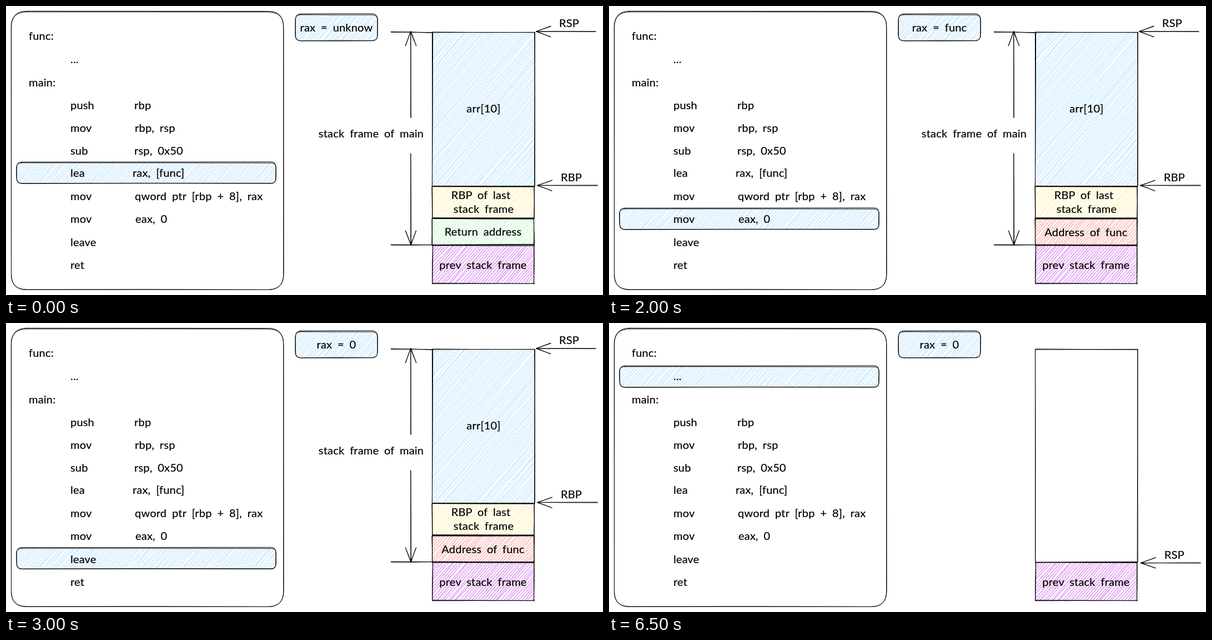
Write an HTML page that moves like this. It is 1075 px wide and 521 px high and loops after 7.5 s.

```html
<!DOCTYPE html>
<html lang="en">
<head>
<meta charset="utf-8">
<title>Stack frame walkthrough</title>
<style>
  html, body { margin: 0; width: 100%; height: 100%; overflow: hidden; background: #fff; }
  svg { display: block; width: 1075px; height: 521px; }
  path { fill: none; stroke: #000; stroke-width: 1; stroke-linecap: round; stroke-linejoin: round; }
  text {
    font: 20px Lato, "Open Sans", sans-serif; letter-spacing: .2px; word-spacing: 4.5px;
    fill: #000; stroke: #000; stroke-width: .2px; white-space: pre;
  }
</style>
</head>
<body>
<svg id="stage" viewBox="0 0 1075 521"></svg>
<script>
const stage = document.getElementById('stage');
const BLUE = '#a5d8ff', YELLOW = '#ffec99', GREEN = '#b2f2bb', RED = '#ff8787', PURPLE = '#cc5de8';
const LOOP = 7500;
const STEPS = [
  { at: 0, row: 282, rax: 'rax = unknow' },
  { at: 1000, row: 325.5, rax: 'rax = func' },
  { at: 2000, row: 365, rax: 'rax = func' },
  { at: 3000, row: 405.5, rax: 'rax = 0' },
  { at: 4000, row: 446, rax: 'rax = 0' },
  { at: 5000, row: 78, rax: 'rax = 0' }
];

let seed = 11;
function random() {
  seed = (seed + 0x6D2B79F5) | 0;
  let t = Math.imul(seed ^ (seed >>> 15), 1 | seed);
  t = (t + Math.imul(t ^ (t >>> 7), 61 | t)) ^ t;
  return ((t ^ (t >>> 14)) >>> 0) / 4294967296;
}
const shake = amount => (random() * 2 - 1) * amount;
const near = (v, amount = .8) => (v + shake(amount)).toFixed(2);

function add(parent, tag, attrs, text) {
  const node = document.createElementNS('http://www.w3.org/2000/svg', tag);
  for (const key in attrs) node.setAttribute(key, attrs[key]);
  if (text) node.textContent = text;
  return parent.appendChild(node);
}

const label = (g, x, y, text, anchor = 'start') => add(g, 'text', { x, y, 'text-anchor': anchor }, text);
const centred = (g, x, y, text) => label(g, x, y, text, 'middle');

// A pen line drawn twice with a small bow
function line(g, x1, y1, x2, y2, amount = .8) {
  let d = '';
  for (let pass = 0; pass < 2; pass++) {
    d += `M${near(x1, amount)} ${near(y1, amount)}` +
      `Q${near((x1 + x2) / 2, amount)} ${near((y1 + y2) / 2, amount)} ${near(x2, amount)} ${near(y2, amount)}`;
  }
  add(g, 'path', { d });
}

function hatch(g, x, y, w, h, colour) {
  const angle = 49 * Math.PI / 180, sin = Math.sin(angle), cos = Math.cos(angle);
  const end = (x + w) * sin + (y + h) * cos;
  let d = '';
  for (let c = x * sin + y * cos + 2; c < end; c += 4) {
    const left = Math.max(x, (c - (y + h) * cos) / sin);
    const right = Math.min(x + w, (c - y * cos) / sin);
    const low = (c - left * sin) / cos, high = (c - right * sin) / cos;
    for (let pass = 0; pass < 2; pass++) {
      d += `M${near(left, 1.4)} ${near(low, 1.4)}L${near(right, 1.4)} ${near(high, 1.4)}`;
    }
  }
  add(g, 'path', { d, style: `stroke:${colour};stroke-width:.7` });
}

function box(g, x, y, w, h, colour) {
  if (colour) hatch(g, x, y, w, h, colour);
  line(g, x, y, x + w, y);
  line(g, x + w, y, x + w, y + h);
  line(g, x + w, y + h, x, y + h);
  line(g, x, y + h, x, y);
}

function roundBox(g, x, y, w, h, r, colour) {
  if (colour) hatch(g, x + 1, y + 1, w - 2, h - 2, colour);
  const X = x + w, Y = y + h;
  let d = '';
  for (const lift of [-.8, .7]) {
    const t = y + lift, b = Y + shake(.6), l = x + shake(.4), k = X + shake(.5);
    d += `M${x + r} ${t}Q${x + w / 2} ${near(t)} ${X - r} ${near(t, .5)}` +
      `Q${k} ${t} ${k} ${y + r}L${near(k, .4)} ${Y - r}` +
      `Q${k} ${b} ${X - r} ${b}Q${x + w / 2} ${near(b)} ${x + r} ${near(b, .5)}` +
      `Q${l} ${b} ${l} ${Y - r}L${near(l, .4)} ${y + r}Q${l} ${t} ${x + r} ${t}`;
  }
  add(g, 'path', { d });
}

function arrow(g, x1, y1, x2, y2) {
  line(g, x1, y1, x2, y2, .5);
  const size = Math.hypot(x2 - x1, y2 - y1);
  const ux = (x1 - x2) / size, uy = (y1 - y2) / size;
  for (const side of [-9.5, 9.5]) {
    line(g, x2, y2, x2 + ux * 26 - uy * side, y2 + uy * 26 + ux * side, .6);
  }
}

function pointer(g, name, tip, tail, y, textX) {
  arrow(g, tail, y, tip, y);
  label(g, textX, y - 8, name);
}

const parts = [];
// A group that is visible for the steps first..last
function part(first, last) {
  const node = add(stage, 'g');
  parts.push({ node, first, last });
  return node;
}

roundBox(stage, 9.5, 10, 490, 501.5, 28);
roundBox(stage, 521, 15, 148, 47.5, 10, BLUE);
const cursor = add(stage, 'g');
roundBox(cursor, 19.5, 0, 467, 37.5, 9, BLUE);
const rax = centred(stage, 595, 45.5, ' ');

const CODE = [
  ['push', 'rbp', 186, 231], ['mov', 'rbp, rsp', 227, 232], ['sub', 'rsp, 0x50', 268, 231],
  ['lea', 'rax, [func]', 307.5, 228], ['mov', 'qword ptr [rbp + 8], rax', 349.5, 232],
  ['mov', 'eax, 0', 391, 233], ['leave', '', 432.5, 0], ['ret', '', 473.5, 0]
];
label(stage, 41, 61, 'func:');
label(stage, 41, 144.5, 'main:');
label(stage, 116, 103, '...');
for (const [op, args, y, x] of CODE) {
  label(stage, 116, y, op);
  if (args) label(stage, x, y, args);
}

const full = part(0, 3);
box(full, 768, 47.5, 184, 277.5, BLUE);
box(full, 767.5, 325.5, 184, 56.5, YELLOW);
centred(full, 860, 191.5, 'arr[10]');
centred(full, 855, 348, 'RBP of last');
centred(full, 860, 372.5, 'stack frame');
line(full, 693, 47, 767, 47.5);
line(full, 693, 430.5, 767, 431);
arrow(full, 729, 201, 729, 46);
arrow(full, 729, 266, 729, 431);
centred(full, 657.5, 236.5, 'stack frame of main');
pointer(full, 'RSP', 955, 1062, 46, 996);
pointer(full, 'RBP', 957, 1065, 323.5, 999);

const popped = part(4, 4);
box(popped, 768, 47.5, 183.5, 334.5);
line(popped, 693, 383.5, 767, 384);
line(popped, 693, 430.5, 767, 431);
centred(popped, 657.5, 416, 'stack frame of main');
pointer(popped, 'RSP', 960, 1066, 382, 1001);

const returned = part(5, 5);
box(returned, 768, 47.5, 183.5, 383.5);
pointer(returned, 'RSP', 958, 1065, 432.5, 1000);

const clean = part(0, 1);
box(clean, 767.5, 384, 183.5, 46.5, GREEN);
centred(clean, 859, 414, 'Return address');

const patched = part(2, 4);
box(patched, 767.5, 384, 183.5, 46.5, RED);
centred(patched, 859, 414.5, 'Address of func');

box(stage, 768, 431.5, 183, 69, PURPLE);
centred(stage, 859, 473.5, 'prev stack frame');

let shown = -1;
function show(index) {
  if (index === shown) return;
  shown = index;
  const step = STEPS[index];
  cursor.setAttribute('transform', `translate(0 ${step.row})`);
  rax.textContent = step.rax;
  for (const { node, first, last } of parts) {
    node.setAttribute('visibility', index >= first && index <= last ? 'visible' : 'hidden');
  }
}

const start = performance.now();
function tick() {
  const time = (performance.now() - start) % LOOP;
  show(STEPS.filter(step => step.at <= time).length - 1);
  requestAnimationFrame(tick);
}
tick();
</script>
</body>
</html>
```
